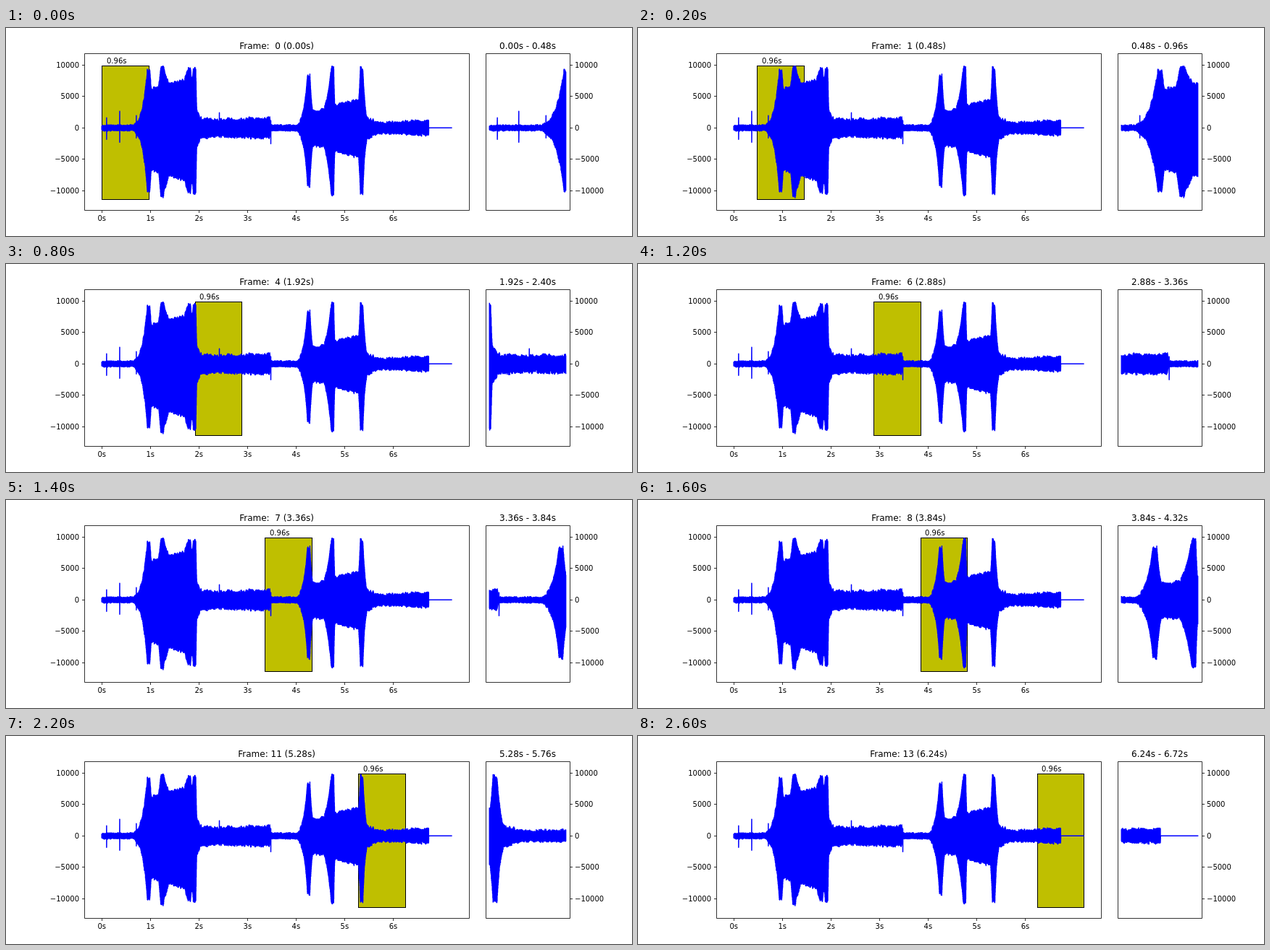
These frames come from a looping animation (864 by 288 pixels, 2.8 s). An HTML page:

```html
<!DOCTYPE html>
<html lang="en">
<head>
<meta charset="utf-8">
<title>Sliding window over a waveform</title>
<style>
  html, body { margin: 0; width: 100%; height: 100%; overflow: hidden; background: #fff; }
  svg { display: block; }
  text { font: 10px "DejaVu Sans", sans-serif; white-space: pre; }
  .title { font-size: 12px; text-anchor: middle; }
  .axis { fill: none; stroke: #000; stroke-width: .8; }
  .wave { fill: none; stroke: #00f; stroke-width: 1.5; stroke-linejoin: round; stroke-linecap: square; }
</style>
</head>
<body>
<svg id="stage" width="864" height="288" viewBox="0 0 864 288"></svg>
<script>
const STEPS = 14, STEP_MS = 200, HOP = 0.48, SPAN = 0.96;
const BIN = 0.003, BINS = 2400, SOUND_END = 6.73;
const ZERO_Y = 137.9, WAVE_Y = 138.3;
const X0 = 132.2, PX = 67.04;
const ZOOM_X = 667.3, ZOOM_PX = 109.7;

// loudness is the loudest of these shapes; heights in pixels, times in seconds
const sounds = [
  peak(.962, 81, .1, .09),
  peak(1.24, 86, .12, .35),
  peak(1.8, 83, .35, .12),
  peak(1.91, 83, .1, .015),
  peak(4.26, 74, .08, .05),
  peak(4.75, 84, .13, .022),
  peak(5.35, 84, .05, .05),
  bed(0, SOUND_END, 4.5, 4.5),
  bed(.98, 1.94, 54, 72),
  bed(1.94, 2.35, 15, 12),
  bed(2.35, 3.46, 12, 15),
  bed(4.3, 4.8, 24, 28),
  bed(4.8, 5.29, 32, 40),
  bed(5.35, 5.7, 19, 8),
  bed(5.7, SOUND_END, 8, 11)
];
// single clicks: time, pixels up, pixels down
const clicks = [[.1, 14, 16], [.37, 23, 20], [.71, 17, 14], [2.42, 21, 13], [3.48, 10, 22]];

// flat between two times, exponential outside
function fade(t, from, to, rise, fall) {
  if (t < from) return Math.exp((t - from) / rise);
  return t > to ? Math.exp((to - t) / fall) : 1;
}

function peak(at, height, rise, fall) {
  return t => height * fade(t, at - .025, at + .025, rise, fall);
}

function bed(from, to, h0, h1) {
  return t => {
    const f = Math.min(1, Math.max(0, (t - from) / (to - from)));
    return (h0 + (h1 - h0) * f) * fade(t, from, to, .015, .015);
  };
}

function seeded(s) {
  return () => {
    s = (s + 0x6D2B79F5) | 0;
    let v = Math.imul(s ^ (s >>> 15), 1 | s);
    v ^= v + Math.imul(v ^ (v >>> 7), 61 | v);
    return ((v ^ (v >>> 14)) >>> 0) / 4294967296;
  };
}

function buildWave() {
  const rnd = seeded(7), wave = [];
  let drift = [0, 0];
  for (let i = 0; i <= BINS; i++) {
    const t = i * BIN;
    const a = t < SOUND_END ? Math.max(...sounds.map(s => s(t))) : 0;
    if (i % 6 === 0) drift = drift.map(() => rnd() - .5);
    // the lower side is a little louder at high levels
    wave.push([a, a * (1 + a * .0013)].map((h, side) => {
      const rough = drift[side] * Math.min(h * .3, 4) - rnd() * Math.min(h * .3, 2.5);
      return Math.max(0, h + rough - .5);
    }));
  }
  for (const [t, up, down] of clicks) wave[Math.round(t / BIN)] = [up, down];
  return wave;
}

const stage = document.getElementById("stage");
const wave = buildWave();
const snap = v => Math.floor(v + .5) + .5;

function add(tag, attrs, text = "") {
  const el = document.createElementNS("http://www.w3.org/2000/svg", tag);
  for (const name in attrs) el.setAttribute(name, attrs[name]);
  el.textContent = text;
  return stage.appendChild(el);
}

function wavePath(from, to, x0, px) {
  let d = "";
  for (let i = from; i <= to; i++) {
    const x = (x0 + (i - from) * BIN * px).toFixed(2);
    const [up, down] = wave[i];
    d += `${d ? "L" : "M"}${x} ${(WAVE_Y - up).toFixed(2)}L${x} ${(WAVE_Y + down).toFixed(2)}`;
  }
  return d;
}

const box = add("rect", { y: 52.5, height: 185, fill: "#bfbf00", stroke: "#000" });
add("path", { class: "wave", d: wavePath(0, BINS, X0, PX) });
const zoom = add("path", { class: "wave" });

let axes = "M108.5 35.5H639.5V252.5H108.5ZM662.5 35.5H778.5V252.5H662.5Z";
for (let s = 0; s <= 6; s++) {
  const x = X0 + s * PX;
  axes += `M${snap(x)} 252.5v3.5`;
  add("text", { x, y: 267, "text-anchor": "middle" }, s + "s");
}
for (let v = -10000; v <= 10000; v += 5000) {
  const y = ZERO_Y - v * .0087, base = Math.round(y + 3.8);
  const label = String(v).replace("-", "\u2212");
  axes += `M108.5 ${snap(y)}h-3.5M778.5 ${snap(y)}h3.5`;
  add("text", { x: 101, y: base, "text-anchor": "end" }, label);
  add("text", { x: 785, y: base }, label);
}
add("path", { class: "axis", d: axes });

const title = add("text", { class: "title", x: 373.6, y: 29 });
const range = add("text", { class: "title", x: 720, y: 29 });
const spanLabel = add("text", { y: 49 }, SPAN + "s");

function show(n) {
  const t = n * HOP, x = X0 + t * PX, first = Math.round(t / BIN);
  const left = snap(x);
  box.setAttribute("x", left);
  box.setAttribute("width", snap(x + SPAN * PX) - left);
  spanLabel.setAttribute("x", Math.round(x + 6.4));
  zoom.setAttribute("d", wavePath(first, first + Math.round(SPAN / BIN), ZOOM_X, ZOOM_PX));
  title.textContent = `Frame: ${String(n).padStart(2)} (${t.toFixed(2)}s)`;
  range.textContent = `${t.toFixed(2)}s - ${(t + HOP).toFixed(2)}s`;
}

let shown = -1;
function tick(now) {
  const n = Math.floor(now / STEP_MS) % STEPS;
  if (n !== shown) show(shown = n);
  requestAnimationFrame(tick);
}
show(shown = 0);
requestAnimationFrame(tick);
</script>
</body>
</html>
```
